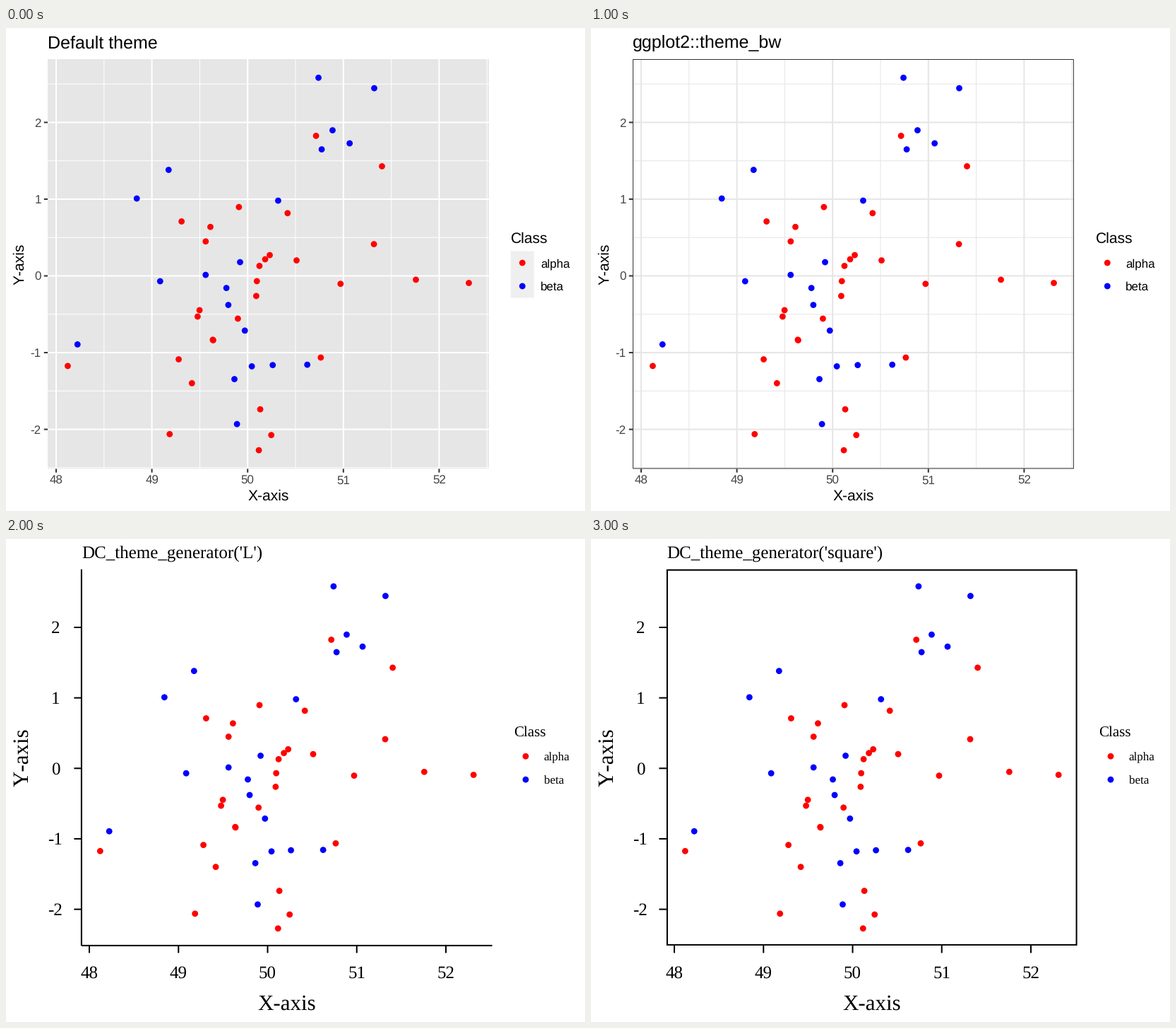
A matplotlib script for the animation above (4 s loop, 820 px wide and 683 px high).

```python
import math
import random

import matplotlib.pyplot as plt
from matplotlib.animation import FuncAnimation
from matplotlib.patches import Circle, Rectangle

W, H, DPI = 820, 683, 64
PT = 72 / DPI          # points per pixel
LINE, RADIUS, GAP, KEY = 2.03, 4.4, 10.5, 32.95
TITLE, TEXT, SMALL = 25, 21, 17
COLORS = {"alpha": "#ff0000", "beta": "#0000ff"}
GREY = "#e6e6e6"

plt.rcParams["text.hinting"] = "none"
plt.rcParams["text.kerning_factor"] = 16   # large factor turns kerning off


def r_generator(seed):
    """Mersenne Twister seeded the way R's set.seed() does it."""
    state = []
    for _ in range(50 + 625):
        seed = (69069 * seed + 1) % 2**32
        state.append(seed)
    rng = random.Random()
    rng.setstate((3, tuple(state[51:]) + (624,), None))
    return rng


def normal(rng):
    """R's rnorm() by inversion; Newton steps invert the normal CDF."""
    big = 2**27
    u, v = rng.getrandbits(32) / 2**32, rng.getrandbits(32) / 2**32
    p = (int(big * u) + v) / big
    z = 0.0
    for _ in range(40):
        cdf = math.erfc(-z / math.sqrt(2)) / 2
        z -= (cdf - p) * math.sqrt(2 * math.pi) * math.exp(z * z / 2)
    return z


def expanded(values):
    pad = 0.05 * (max(values) - min(values))
    return min(values) - pad, max(values) + pad


N = 50
rng = r_generator(100)
XS = [50 + normal(rng) for _ in range(N)]
YS = [normal(rng) for _ in range(N)]
CLASSES = [{"a": "alpha", "b": "beta"}[c] for c in "aabbabaaba" * 5]
X_RANGE, Y_RANGE = expanded(XS), expanded(YS)

SANS = dict(
    font="Liberation Sans", panel=(59.04, 44.0, 683.9, 623.4), digit=0.716,
    axis_size=TEXT, tick_size=SMALL, tick_len=5.24, tick_color="#333333",
    text_color="#444444", x_gap=4.2, y_gap=4.1, y_align="right",
)
SERIF = dict(
    font="Liberation Serif", panel=(106.9, 42.8, 688.6, 574.9), digit=0.676,
    axis_size=31, tick_size=25, tick_len=10.5, tick_color="black",
    text_color="black", x_gap=18.8, y_gap=26.6, y_align="center",
)

THEMES = [
    ("Default theme", SANS, "grey"),
    ("ggplot2::theme_bw", SANS, "bw"),
    ("DC_theme_generator('L')", SERIF, "L"),
    ("DC_theme_generator('square')", SERIF, "square"),
]

fig = plt.figure(figsize=(W / DPI, H / DPI), dpi=DPI, facecolor="white")
ax = fig.add_axes([0, 0, 1, 1])


def line(x1, y1, x2, y2, color, width=LINE):
    ax.plot([x1, x2], [y1, y2], color=color, lw=width * PT,
            solid_capstyle="butt", snap=False)


def box(left, top, right, bottom, fill):
    ax.add_patch(Rectangle((left, top), right - left, bottom - top,
                           fc=fill, lw=0, snap=False))


def inner_border(left, top, right, bottom, color, width):
    ax.add_patch(Rectangle((left + width / 2, top + width / 2),
                           right - left - width, bottom - top - width,
                           fill=False, ec=color, lw=width * PT,
                           joinstyle="miter", snap=False, zorder=4))


def dot(x, y, name):
    ax.add_patch(Circle((x, y), RADIUS, fc=COLORS[name], lw=0, zorder=3))


def draw(index):
    title, s, style = THEMES[index]
    left, top, right, bottom = panel = s["panel"]
    x_mid, y_mid = (left + right) / 2, (top + bottom) / 2
    tick, size = s["tick_len"], s["tick_size"]

    def px(x):
        lo, hi = X_RANGE
        return left + (x - lo) / (hi - lo) * (right - left)

    def py(y):
        lo, hi = Y_RANGE
        return bottom - (y - lo) / (hi - lo) * (bottom - top)

    def label(x, y, text, size, color="black", ha="left", rotation=0):
        ax.text(x, y, text, fontsize=size * PT, family=s["font"], color=color,
                ha=ha, va="baseline", rotation=rotation,
                rotation_mode="anchor")

    ax.clear()
    ax.set(xlim=(0, W), ylim=(H, 0))
    ax.axis("off")

    legend_x, key_y = right + 30.9, y_mid - 1.6
    if style == "grey":
        box(*panel, GREY)
        box(legend_x, key_y - KEY / 2, legend_x + KEY, key_y + KEY * 1.5,
            "#efefef")
    if style in ("grey", "bw"):
        grid = "white" if style == "grey" else GREY
        for k in range(10):
            width = LINE / (1 + k % 2)
            x = px(48 + k / 2)
            line(x, top, x, bottom, grid, width)
        for k in range(-5, 6):
            width = LINE / (1 + k % 2)
            line(left, py(k / 2), right, py(k / 2), grid, width)

    for x, y, name in zip(XS, YS, CLASSES):
        dot(px(x), py(y), name)

    if style == "bw":
        inner_border(*panel, "#333333", LINE / 2)
    elif style == "square":
        inner_border(*panel, "black", LINE)
    elif style == "L":
        line(left, top, left, bottom, "black")
        line(left, bottom, right, bottom, "black")

    for x in range(48, 53):
        line(px(x), bottom, px(x), bottom + tick, s["tick_color"])
        label(px(x), bottom + tick + s["x_gap"] + s["digit"] * size, str(x),
              size, s["text_color"], "center")
    for y in range(-2, 3):
        line(left - tick, py(y), left, py(y), s["tick_color"])
        label(left - tick - s["y_gap"], py(y) + s["digit"] * size / 2, str(y),
              size, s["text_color"], s["y_align"])

    axis_size = s["axis_size"]
    label(left, top - GAP - 5.2, title, TITLE)
    label(x_mid, H - GAP - 0.21 * axis_size, "X-axis", axis_size, ha="center")
    label(GAP + s["digit"] * axis_size, y_mid, "Y-axis", axis_size,
          ha="center", rotation=90)

    label(legend_x, y_mid - 30.4, "Class", TEXT)
    for row, name in enumerate(COLORS):
        y = key_y + row * KEY
        dot(legend_x + KEY / 2, y, name)
        label(legend_x + KEY + 9.4, y + s["digit"] * SMALL / 2, name, SMALL)
    return []


anim = FuncAnimation(fig, draw, frames=len(THEMES), interval=1000, repeat=True,
                     init_func=lambda: draw(0))
plt.show()
```
